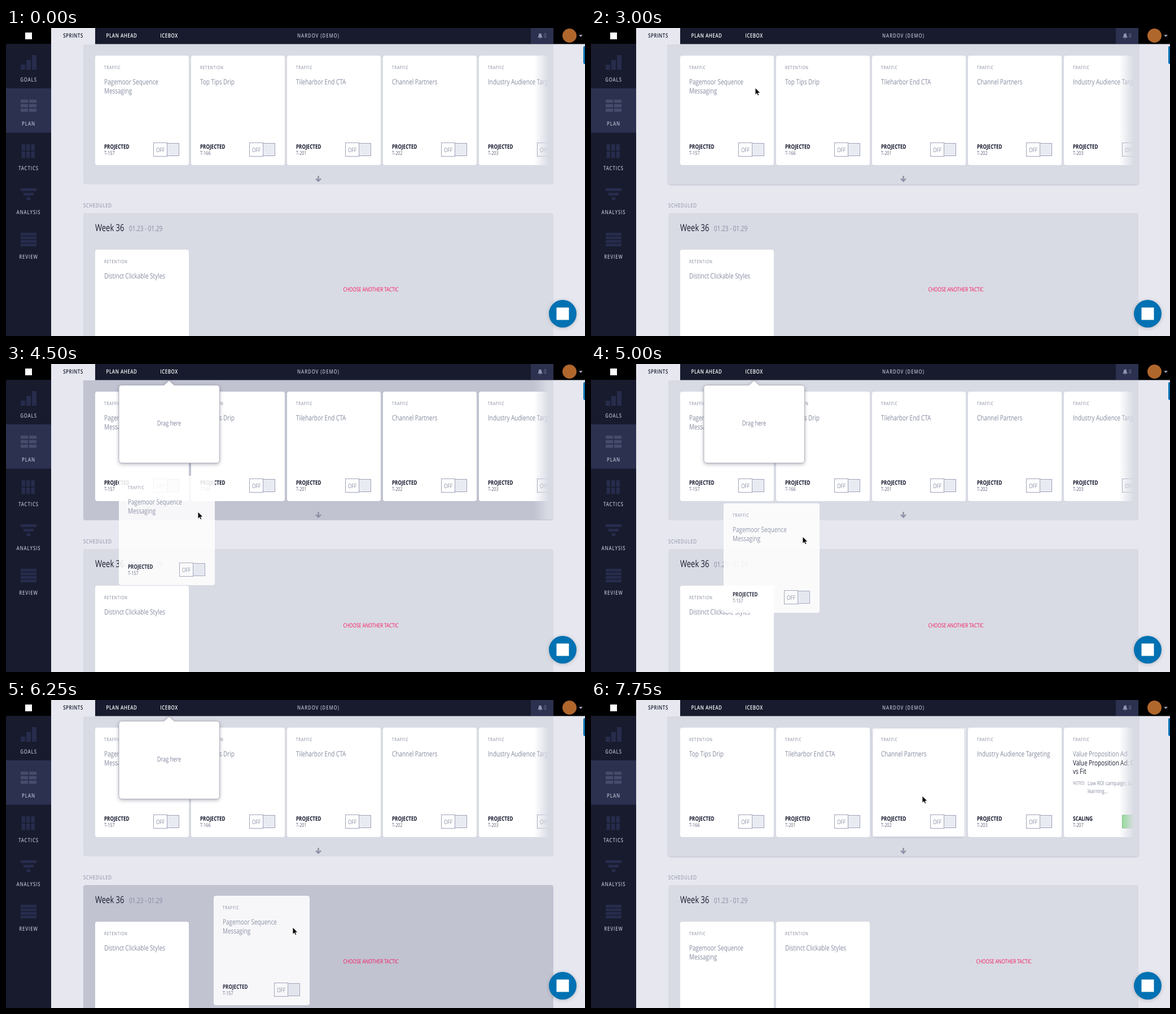
An HTML page for the animation above (8 s loop, 1026x546 px).

```html
<!DOCTYPE html>
<html lang="en">
<head>
<meta charset="utf-8">
<title>Sprint board</title>
<style>
  html, body { margin: 0; width: 100%; height: 100%; overflow: hidden; background: #e6e7ef; }
  svg { display: block; width: 1026px; height: 546px; }
  text { font: 13px "Open Sans", "Noto Sans", sans-serif; fill: #858aa0; white-space: pre; text-rendering: geometricPrecision; }
  .mid { text-anchor: middle; }
  .nav { font-size: 10.4px; font-weight: 600; letter-spacing: .7px; fill: #fff; }
  .side { font-size: 10.2px; font-weight: 600; letter-spacing: 1.15px; fill: #b4b7c9; }
  .cat { font-size: 8.4px; letter-spacing: 1px; fill: #7d829a; }
  .head { font-size: 10px; letter-spacing: 1px; }
  .state { font-size: 10.6px; font-weight: 700; fill: #10142a; }
  .id { font-size: 9.6px; fill: #62677f; }
  .off { font-size: 10.8px; }
  .dark { fill: #171b2d; }
  .week { font-size: 17px; fill: #171b2d; }
  .pick { font-size: 10.4px; font-weight: 500; fill: #f5145f; }
  .note { font-size: 10.2px; }
  .tiny { font-size: 8.3px; }
  .drop { font-size: 12px; fill: #7d829b; }
  .panel { fill: #d9dbe4; }
  .panel.over { fill: #c1c3d1; }
  .panel.hover { filter: drop-shadow(0 1px 1.5px rgba(50, 56, 90, .25)); }
  .icon { fill: #272c4c; }
  #popup { filter: drop-shadow(0 2px 3px rgba(30, 34, 60, .32)); }
  #cardHover { filter: drop-shadow(0 1px 1px rgba(60, 66, 100, .2)); }
  #chat { filter: drop-shadow(0 1px 3px rgba(0, 0, 0, .2)); }
</style>
</head>
<body>
<svg id="stage" viewBox="0 0 1026 546"></svg>
<script>
const STEP = 250, STEPS = 32, CONDENSED = .766;

const text = (s, x, y, cls = '') =>
  `<text class="${cls}" transform="translate(${x} ${y}) scale(${CONDENSED} 1)">${s}</text>`;
const rect = (x, y, w, h, fill, extra = '') =>
  `<rect x="${x}" y="${y}" width="${w}" height="${h}" ${fill ? `fill="${fill}"` : ''} ${extra}/>`;
const icon = (x, y, w, h) => rect(x, y, w, h, '', 'class="icon"');
const lines = (list, x, y, cls) => list.map((s, i) => text(s, x, y + i * 15.5, cls)).join('');

function toggle(x, on) {
  if (on) return rect(x + .5, 155, 46, 23, '#86dc8a', 'stroke="#74b97b"');
  return rect(x + 24.5, 155.5, 21, 22, '#e9ebf2', 'stroke="#9ea2b9"') +
    rect(x + .5, 154.5, 24, 24, '#fff', 'stroke="#9ea2b9"') +
    text('OFF', x + 12.5, 170.5, 'off mid');
}

function card(c, x, y, w = 166) {
  return `<g transform="translate(${x} ${y})">` +
    rect(0, 0, w, 194, '#fff', 'rx="4"') +
    text(c.cat, 16, 24, 'cat') + lines(c.title, 16, 51) +
    (c.extra || '') +
    text(c.state || 'PROJECTED', 16, 165, 'state') + text(c.id, 16, 175.5, 'id') +
    toggle(w - 63, c.state) + '</g>';
}

const make = (cat, id, ...title) => ({ cat, id, title });
const first = make('TRAFFIC', 'T-157', 'Pagemoor Sequence', 'Messaging');
const styles = make('RETENTION', 'T-148', 'Distinct Clickable Styles');
const queue = [
  make('RETENTION', 'T-166', 'Top Tips Drip'),
  make('TRAFFIC', 'T-201', 'Tileharbor End CTA'),
  make('TRAFFIC', 'T-202', 'Channel Partners'),
  make('TRAFFIC', 'T-203', 'Industry Audience Targeting'),
  { ...make('TRAFFIC', 'T-207', 'Value Proposition Ad'), state: 'SCALING',
    extra: lines(['Value Proposition Ad: Cost', 'vs Fit'], 16, 66.5, 'dark') +
      text('NOTES:', 16, 101, 'tiny') + text('Low ROI campaign, but', 42, 102, 'note') +
      text('learning...', 42, 115.5, 'note') }
];
const row = (cards, y) => cards.map((c, i) => card(c, 158 + 170 * i, y)).join('');

const board = `
  <rect id="top" class="panel" x="137" y="20" width="833" height="257" rx="4"/>
  <g clip-path="url(#rowClip)">
    <g id="rowBefore">${row([first, ...queue.slice(0, 4)], 49)}</g>
    <g id="rowAfter">${row(queue, 49)}</g>
    <rect id="cardHover" x="498.5" y="49.5" width="164" height="193" rx="4" fill="none" stroke="#d3d6e2"/>
  </g>
  ${rect(936, 28, 34, 248, 'url(#fade)')}
  <path d="M553.5 262v9M549 267l4.5 4.5 4.5-4.5" fill="none" stroke="#8c90a6" stroke-width="2.4"/>
  ${text('SCHEDULED', 137, 317.5, 'head')}
  <rect id="bottom" class="panel" x="137" y="328" width="833" height="240" rx="4"/>
  ${text('Week 36', 158, 360, 'week')}${text('01.23 - 01.29', 218, 360)}
  <g id="weekBefore">${row([styles], 393)}${text('CHOOSE ANOTHER TACTIC', 646.5, 466.5, 'pick mid')}</g>
  <g id="weekAfter">${row([first, styles], 393)}${text('CHOOSE ANOTHER TACTIC', 731.5, 466.5, 'pick mid')}</g>`;

const bars = n => [...Array(n).keys()];
const sidebar = rect(0, 28, 80, 518, '#171b2d') + rect(0, 107, 80, 78.5, '#2c3150') +
  bars(3).map(i => icon(26 + 10 * i, 65 - 8.5 * i, 8, 9 + 8.5 * i)).join('') +
  bars(6).map(i => rect(26 + 15 * (i % 2), 127 + 8 * (i >> 1), 13, 5.5, '#474c6d')).join('') +
  bars(6).map(i => icon(27.5 + 8.5 * (i % 3), 206 + 13 * (i > 2), 6.5, 11.5)).join('') +
  icon(26, 284, 28, 5) + icon(31, 292, 18, 5) + icon(36.5, 300, 7, 5) +
  bars(4).map(i => icon(26, 363 + 6.4 * i, 28, 5)).join('') +
  ['GOALS', 'PLAN', 'TACTICS', 'ANALYSIS', 'REVIEW']
    .map((s, i) => text(s, 40, 94.5 + 78.6 * i, 'side mid')).join('');

const header = rect(0, 0, 1026, 28.5, '#171b2d') + rect(0, 0, 80, 28, '#000') +
  rect(34, 8, 12, 12, '#fff') + rect(80, 0, 78, 29, '#e6e7ef') +
  text('SPRINTS', 119, 17, 'nav mid dark') + text('PLAN AHEAD', 205, 17, 'nav mid') +
  text('ICEBOX', 289, 17, 'nav mid') + text('NARDOV (DEMO)', 553.5, 17, 'side mid') +
  rect(930, 0, 40, 28, '#2c3150') + rect(970, 0, 56, 28, '#000') +
  `<path d="M942 17q2-2 2-5a2.5 2.5 0 0 1 5 0q0 3 2 5zM945 18h3q-1.5 2-3 0z" fill="#8e93ae"/>
  ${text('0', 953, 17, 'note')}
  <circle cx="998.5" cy="13.5" r="12.5" fill="#b0672c"/>
  <path d="M1015 12h7l-3.5 4z" fill="#9a9dae"/>`;

const popup = `<g id="popup">
  <path d="M205 37.5H280l9-8 9 8H373.5a5 5 0 0 1 5 5V170.5a5 5 0 0 1-5 5H205a5 5 0 0 1-5-5V42.5a5 5 0 0 1 5-5z"
    fill="#fff" stroke="#a3a5b0" stroke-width=".8"/>
  <rect id="target" x="208" y="45" width="162" height="122" fill="#dddde1"/>
  ${text('Drag here', 289, 109, 'drop mid')}</g>`;

document.getElementById('stage').innerHTML = `
  <defs>
    <clipPath id="rowClip"><rect x="150" y="28" width="813" height="248"/></clipPath>
    <linearGradient id="fade"><stop offset="0" stop-color="#d9dbe4" stop-opacity="0"/>
      <stop offset=".76" stop-color="#d9dbe4"/></linearGradient>
  </defs>
  ${rect(0, 0, 1026, 546, '#e6e7ef')}${board}${sidebar}${header}${popup}
  <g id="lift" opacity=".87">${card(first, 0, 0, 170)}</g>
  ${rect(1023, 32, 8, 32, '#0071b2', 'rx="3"')}
  <circle id="chat" cx="986.5" cy="506.5" r="24.5" fill="#0071b2"/>
  ${rect(975.5, 495.5, 22, 22, '#fff')}
  <path id="cursor" d="M0 0V12.5L2.9 9.8 4.7 14 6.8 13.1 5 9H9z" fill="#000" stroke="#fff" stroke-width=".9"/>`;

// Waypoints: [step, x, y]
const cursorPath = [[3, 1, 533], [5, 337, 26], [6, 290.5, 92.5], [7, 290, 105], [8, 982, 534],
  [11, 420, 150], [12, 291, 106], [13, 291, 106], [15, 297.5, 168], [18, 340, 262], [20, 375, 306],
  [22, 484, 382], [25, 508, 403], [26, 510.5, 406], [30, 557, 166], [31, 587, 170]];
const liftPath = [[13, 158, 50], [15, 163.5, 111], [18, 200, 198], [20, 235, 247],
  [22, 344, 326], [25, 368, 347]];

function along(path, k) {
  const i = path.findIndex(p => p[0] >= k);
  if (i < 0) return path[path.length - 1].slice(1);
  const b = path[i], a = path[i - 1] || b;
  const f = a === b ? 0 : (k - a[0]) / (b[0] - a[0]);
  return [1, 2].map(n => a[n] + (b[n] - a[n]) * f);
}

const el = id => document.getElementById(id);
const within = (k, from, to) => k >= from && k <= to;
const show = (id, on) => { el(id).style.display = on ? '' : 'none'; };
const place = (id, path, k) => el(id).setAttribute('transform', `translate(${along(path, k)})`);

function draw(k) {
  const dropped = k >= 26;
  show('rowBefore', !dropped);
  show('weekBefore', !dropped);
  show('rowAfter', dropped);
  show('weekAfter', dropped);
  show('cardHover', k >= 30);
  show('popup', within(k, 13, 26));
  show('target', within(k, 14, 15));
  el('popup').style.opacity = k === 13 ? .5 : dropped ? .32 : 1;
  show('lift', within(k, 13, 25));
  show('cursor', within(k, 3, 8) || k >= 11);
  el('top').classList.toggle('over', within(k, 16, 19));
  el('top').classList.toggle('hover', within(k, 11, 14) || k >= 29);
  el('bottom').classList.toggle('over', within(k, 21, 25));
  el('bottom').classList.toggle('hover', within(k, 26, 27));
  place('lift', liftPath, k);
  place('cursor', cursorPath, k);
}

const start = performance.now();
function tick() {
  draw(Math.floor((performance.now() - start) / STEP) % STEPS);
  requestAnimationFrame(tick);
}
tick();
</script>
</body>
</html>
```
